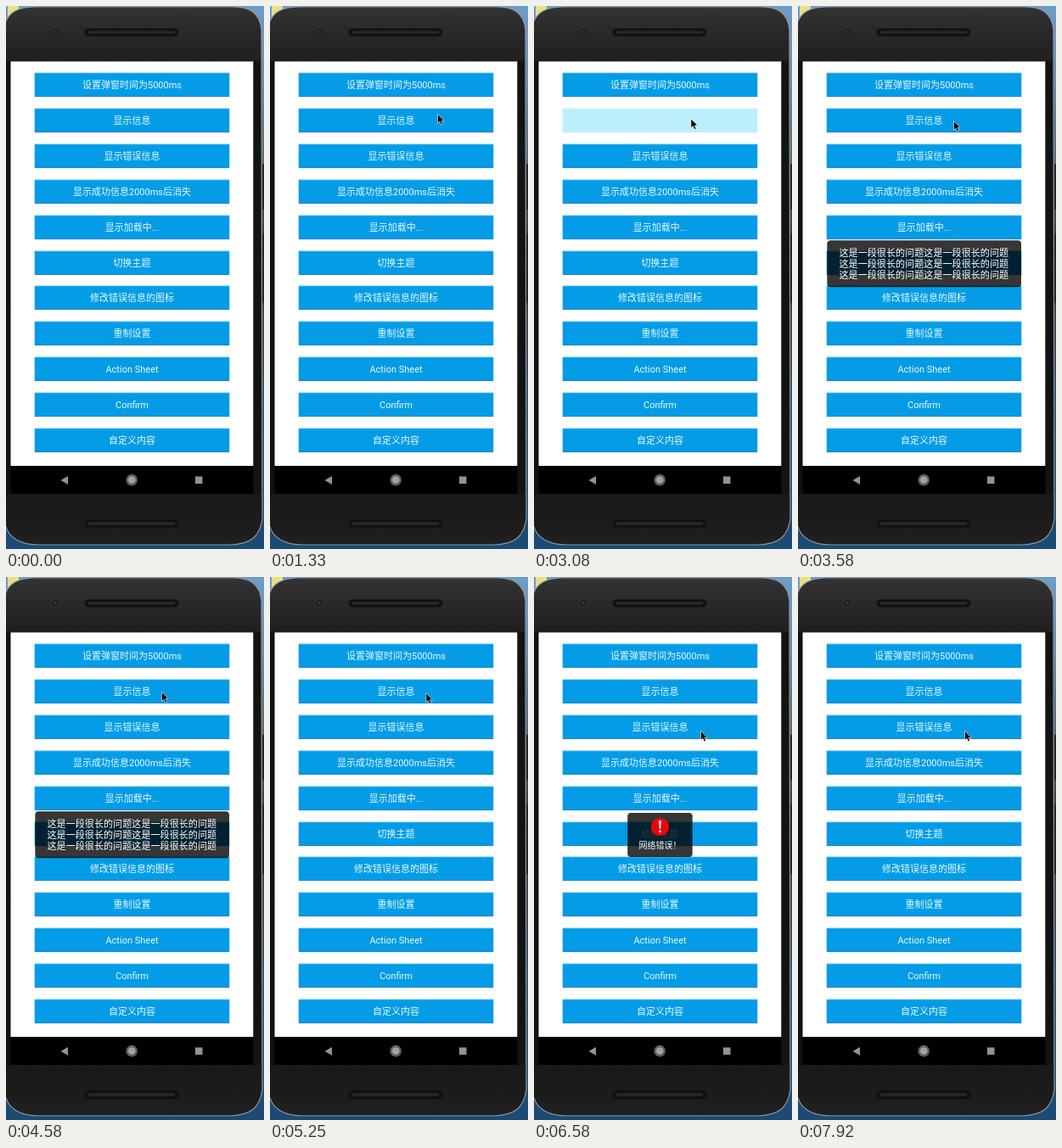
An HTML page with a canvas for the animation above (8 s loop, 304 by 640 pixels).

```html
<!DOCTYPE html>
<html lang="zh-CN">
<head>
<meta charset="utf-8">
<title>Toast demo</title>
<style>
  html, body { margin: 0; width: 100%; height: 100%; overflow: hidden; background: #1b4a73; }
  canvas { display: block; width: 304px; height: 640px; }
</style>
</head>
<body>
<canvas id="stage"></canvas>
<script>
const W = 304, H = 640, LOOP = 8000;
const FONT = 'Roboto, "Noto Sans CJK SC", "Noto Sans CJK", sans-serif';
const LABELS = ['设置弹窗时间为5000ms', '显示信息', '显示错误信息', '显示成功信息2000ms后消失',
  '显示加载中...', '切换主题', '修改错误信息的图标', '重制设置', 'Action Sheet', 'Confirm', '自定义内容'];
const LONG = '这是一段很长的问题'.repeat(2);

// time, x, y of the pointer tip
const PATH = [[860, 304, 150], [1300, 197.5, 127.5], [1700, 197.5, 127.5], [2400, 185, 133],
  [3200, 185, 133], [3500, 183.5, 135.5], [5200, 183.5, 135.5], [5600, 196.5, 181.5], [LOOP, 196.5, 181.5]];
const PRESSES = [
  { row: 1, down: 2935, up: 3120 },
  { row: 2, down: 5640, up: 5830 }
];
const TOASTS = [
  { from: 3130, to: 5130, draw: infoToast },
  { from: 5840, to: 7840, draw: errorToast }
];
const PRESSED = 0.26;

const canvas = document.getElementById('stage');
const ctx = canvas.getContext('2d');
const scale = window.devicePixelRatio || 1;
canvas.width = W * scale;
canvas.height = H * scale;

const clamp = v => Math.max(0, Math.min(1, v));
const ease = v => v < 0.5 ? 2 * v * v : 1 - 2 * (1 - v) * (1 - v);
const mix = (a, b, k) => a + (b - a) * k;

function rect(x, y, w, h, fill) {
  ctx.fillStyle = fill;
  ctx.fillRect(x, y, w, h);
}

function round(x, y, w, h, r, fill, stroke) {
  ctx.beginPath();
  ctx.roundRect(x, y, w, h, r);
  ctx.fillStyle = fill;
  ctx.fill();
  if (stroke) {
    ctx.strokeStyle = stroke;
    ctx.lineWidth = 1;
    ctx.stroke();
  }
}

function disc(x, y, r, fill) {
  ctx.beginPath();
  ctx.arc(x, y, r, 0, Math.PI * 2);
  ctx.fillStyle = fill;
  ctx.fill();
}

function poly(points, fill) {
  ctx.beginPath();
  points.forEach(([x, y]) => ctx.lineTo(x, y));
  ctx.closePath();
  ctx.fillStyle = fill;
  ctx.fill();
}

function text(str, x, y, size, fill = '#fff') {
  ctx.font = `${size}px ${FONT}`;
  ctx.textAlign = 'center';
  ctx.textBaseline = 'alphabetic';
  ctx.fillStyle = fill;
  ctx.fillText(str, x, y);
}

function fade(y0, y1, ...stops) {
  const g = ctx.createLinearGradient(0, y0, 0, y1);
  stops.forEach(([at, color]) => g.addColorStop(at, color));
  return g;
}

function bodyPath() {
  ctx.beginPath();
  ctx.moveTo(-1, 20);
  ctx.bezierCurveTo(4, 7, 14, 1.5, 34, 1);
  ctx.lineTo(268, 1);
  ctx.bezierCurveTo(288, 1.5, 299, 8, 301, 28);
  ctx.lineTo(302, 604);
  ctx.bezierCurveTo(299, 626, 288, 634.5, 264, 635);
  ctx.lineTo(38, 635);
  ctx.bezierCurveTo(16, 634.5, 3, 627, -1, 611);
  ctx.closePath();
}

function speaker(y) {
  round(93, y, 110, 8, 4, '#151515', '#090909');
  round(97, y + 2.5, 102, 3, 1.5, '#292929');
}

function phone() {
  rect(0, 0, W, H, fade(0, H, [0, '#6c9cca'], [0.12, '#6a8fb3'], [0.28, '#56687c'],
    [0.4, '#454049'], [0.55, '#443f42'], [0.75, '#285078'], [1, '#1b4a73']));
  rect(2, 0, 13, 12, '#eadf86');
  bodyPath();
  ctx.fillStyle = fade(0, H, [0, '#343434'], [0.04, '#2b2b2b'], [0.1, '#1f1f1f'],
    [0.9, '#191919'], [0.96, '#1c1c1c'], [1, '#222']);
  ctx.fill();
  ctx.strokeStyle = '#92979b';
  ctx.lineWidth = 1.2;
  ctx.stroke();
  rect(0, 65, 5.5, 510, '#101010');
  rect(291, 65, 9, 510, '#131313');
  rect(302, 186, 2, 54, '#25262a');
  rect(302, 268, 2, 82, '#25262a');
  disc(58, 30.5, 3, '#191919');
  disc(58, 30.5, 1.5, '#404046');
  speaker(27);
  speaker(606);

  rect(5.5, 65.4, 285.8, 476.6, '#fff');
  rect(5.5, 542, 285.8, 33, '#000');
  poly([[64.5, 559], [73, 554], [73, 564]], '#939393');
  disc(148.2, 558.7, 6.6, '#858585');
  disc(148.2, 558.7, 5.5, '#171717');
  disc(148.2, 558.7, 4.8, '#a0a0a0');
  rect(223, 554.5, 8.5, 8.5, '#939393');
}

function pressAlpha(row, t) {
  const p = PRESSES.find(q => q.row === row);
  if (!p || t < p.down) return 1;
  return t < p.up
    ? mix(1, PRESSED, ease(clamp((t - p.down) / 150)))
    : mix(PRESSED, 1, ease(clamp((t - p.up) / 250)));
}

function button(label, row, t) {
  const y = Math.round(79 + row * 41.9);
  const alpha = pressAlpha(row, t);
  ctx.globalAlpha = alpha;
  if (alpha < 1) {
    rect(33.7, y - 0.3, 229.6, 28.4, '#00c0f8');
  } else {
    rect(33.7, y - 0.3, 229.6, 28.4, '#049ce6');
    rect(34, y, 229, 1, '#28abe4');
    rect(34, y + 27, 229, 1, '#2586b8');
  }
  text(label, 148.5, y + 18.2, 11, '#e6fbff');
  ctx.globalAlpha = 1;
}

function infoToast() {
  round(34.3, 276.2, 228.7, 55, 4, 'rgba(0,0,0,.79)');
  for (let i = 0; i < 3; i++) text(LONG, 148.3, 295 + i * 13.2, 11.1);
}

function errorToast() {
  round(110.2, 278, 76.5, 52, 4, 'rgba(0,0,0,.79)');
  disc(148.5, 294.5, 10.6, '#f00505');
  poly([[147, 287.2], [150, 287.2], [149.2, 297], [147.8, 297]], '#fff');
  disc(148.5, 299.8, 1.4, '#fff');
  text('网络错误！', 148.5, 320, 10);
}

function pointer(t) {
  if (t < PATH[0][0]) return;
  const i = Math.max(1, PATH.findIndex(p => p[0] > t));
  const [t0, x0, y0] = PATH[i - 1], [t1, x1, y1] = PATH[i];
  const k = ease(clamp((t - t0) / (t1 - t0)));
  ctx.save();
  ctx.translate(mix(x0, x1, k), mix(y0, y1, k));
  poly([[0, 0], [0, 10.8], [2.4, 8.6], [4.2, 12.5], [6, 11.6], [4.4, 7.9], [7.6, 7.6]], '#000');
  ctx.strokeStyle = 'rgba(255,255,255,.85)';
  ctx.lineWidth = 0.7;
  ctx.stroke();
  ctx.restore();
}

function frame(now) {
  const t = now % LOOP;
  ctx.setTransform(scale, 0, 0, scale, 0, 0);
  phone();
  LABELS.forEach((label, row) => button(label, row, t));
  TOASTS.forEach(toast => {
    if (t >= toast.from && t < toast.to) toast.draw();
  });
  pointer(t);
}

const start = performance.now();
function tick() {
  frame(performance.now() - start);
  requestAnimationFrame(tick);
}
tick();
</script>
</body>
</html>
```
